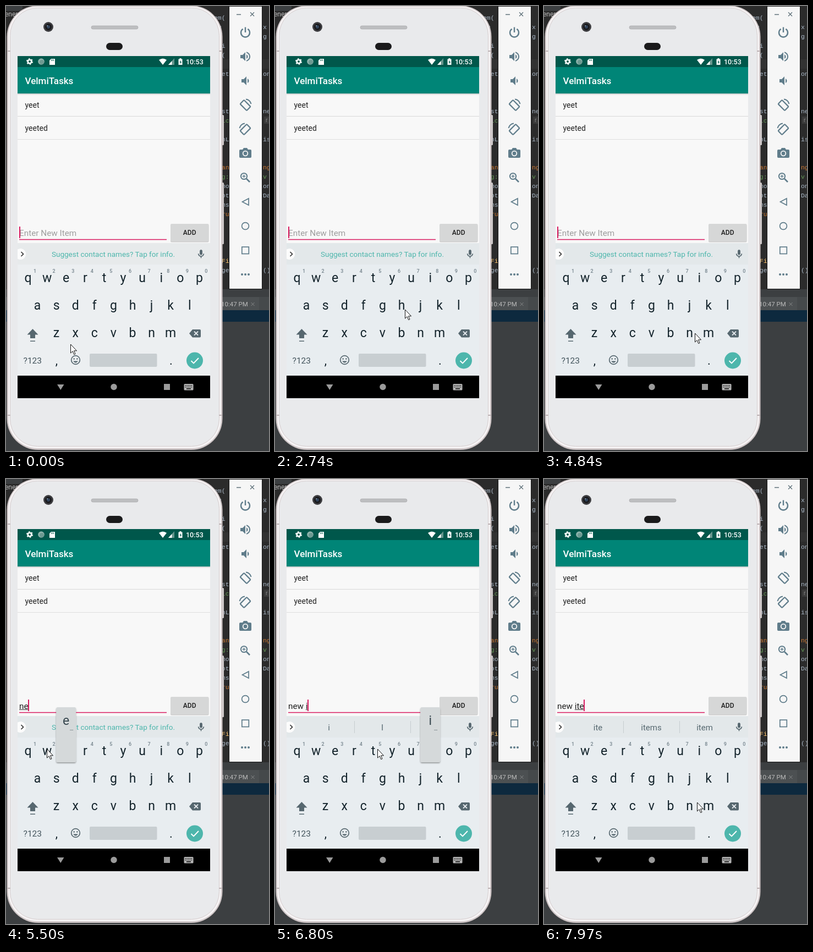
An HTML page for the animation above (8000 ms loop, 478 px wide and 809 px high).

```html
<!DOCTYPE html>
<html lang="en">
<head>
<meta charset="utf-8">
<title>To-do list typing</title>
<style>
html, body { margin: 0; width: 100%; height: 100%; overflow: hidden; background: #3c3f41; }
svg { display: block; width: 478px; height: 809px; }
text { font-family: Roboto, sans-serif; white-space: pre; }
.code { font: 11.5px "Liberation Mono", monospace; fill: #a9b7c6; }
</style>
</head>
<body>
<svg id="stage" viewBox="0 0 478 809"></svg>
<script>
const LOOP = 8000;
const INK = '#13232b', GREY = '#56676f', TOOL = '#607d8b', PINK = '#d81b60', TEAL = '#4db6ac';
const FIELD_SIZE = 15.3;

const rect = (x, y, w, h, fill, extra = '') =>
  `<rect x="${x}" y="${y}" width="${w}" height="${h}" fill="${fill}" ${extra}/>`;
const circle = (x, y, r, fill, extra = '') =>
  `<circle cx="${x}" cy="${y}" r="${r}" fill="${fill}" ${extra}/>`;
const label = (s, x, y, size, fill, extra = '') =>
  `<text x="${x}" y="${y}" font-size="${size}" fill="${fill}" ${extra}>${s}</text>`;
const line = (d, color, width = 1, extra = '') =>
  `<path d="${d}" fill="none" stroke="${color}" stroke-width="${width}" ${extra}/>`;
const shape = (d, fill, extra = '') => `<path d="${d}" fill="${fill}" ${extra}/>`;
// 24-unit icon centred on x, y
const icon = (x, y, scale, body) =>
  `<g transform="translate(${x} ${y}) scale(${scale}) translate(-12 -12)">${body}</g>`;
const MID = 'text-anchor="middle"';

function editor() {
  const rows = [
    [21, 'tem(', ''], [38, 'tem', 'ex'], [55, ' =', '.g'], [72, ' (i', ''], [89, ' t(', ''],
    [123, '  et', 'ion'], [191, '  st', 'ene'], [208, '  ic', '', '#629755'], [242, '  nL', 'Lis'],
    [293, '  an', 'ong', '#cc7832'], [310, '  g:', 'iv', '#629755'], [327, '  mo', 'ion'],
    [344, '  ot', 'yDa'], [361, '  ms', ''], [378, '  ru', '', '#cc7832'], [463, '  Fi', '', '#ffc66d'],
    [480, '  ge', 'r()']
  ];
  let s = rect(0, 0, 478, 515, '#2b2b2b') + rect(0, 0, 30, 9, '#3c3f41') + rect(372, 97, 106, 17, '#323232');
  for (const [y, a, b, color = '#a9b7c6'] of rows) {
    const x = a[0] === 't' ? 371 : 378;
    s += `<text class="code" x="${x}" y="${y + 4}" style="fill:${color}">${a}</text>` +
         `<text class="code" x="460" y="${y + 4}" style="fill:${color}">${b}</text>`;
  }
  s += rect(469, 201, 9, 13, '#3b3b3b') + label('r', 472, 211, 10, '#888');
  s += label('enera', -2, 19, 12, '#bbb');
  s += rect(0, 515, 478, 294, '#3c3f41') + rect(0, 529, 460, 24, '#4c5052') +
       rect(460, 529, 18, 24, '#45494b') + rect(0, 553, 478, 21, '#0d293e');
  s += line('M445.500 539l6 6m0-6l-6 6', '#87898a');
  return s;
}

function phone() {
  return rect(391, 198, 5, 55, '#cfcacb', 'rx="1.5"') + rect(391, 321, 5, 112, '#cfcacb', 'rx="1.5"') +
    rect(1.5, -1, 392, 808, '#cfc6c7', 'rx="57"') +
    rect(4, 1, 387, 803, '#f6f4f5', 'rx="53"') +
    rect(7.5, 3.5, 380, 797, '#e9eaec', 'rx="50" stroke="#d5cccd"') +
    line('M2 82h6M387 82h6M2 744h6M387 744h6', '#bcb2b4', 2) +
    circle(77, 38, 9, '#3d3d40') + circle(77, 38, 6, '#19191c') + circle(77, 38, 3, '#31435a') + circle(75, 36, 1, '#8fa3b5') +
    rect(155, 36, 85, 6, '#bdbec0', 'rx="3" stroke="#a9aaad" stroke-width=".7"') +
    rect(182, 67, 30, 13, '#1a1a1b', 'rx="6.5"') +
    label('10:47 PM', 391, 546, 11.5, '#bbb');
}

function toolbar() {
  const vol = 'M3 9v6h4l5 5V4L7 9H3z';
  const wave = 'M16.5 12c0-1.77-1.02-3.29-2.5-4.03v8.05c1.48-.73 2.5-2.25 2.5-4.02z';
  const far = 'M14 3.23v2.06c2.89.86 5 3.54 5 6.71s-2.11 5.85-5 6.71v2.06c4.01-.91 7-4.49 7-8.77s-2.99-7.86-7-8.77z';
  const turn = rect(7, 4, 10, 17, 'none', `rx="1.2" transform="rotate(-45 12 12.500)" stroke="${TOOL}" stroke-width="2.2"`) +
    line('M13 1.5A10.500 10.500 0 0 1 22.500 10', TOOL, 2);
  return rect(405.5, .5, 60, 514, '#f6f6f6', 'stroke="#151515"') +
    line('M419 15.5h8M444 11.500l7 7m0-7l-7 7', '#5d6f78', 1.3) +
    line('M430.600 41.800A8 8 0 1 0 439.400 41.800M435 38.500v9.500', TOOL, 2.4) +
    icon(435, 92, 1, shape(vol + wave + far, TOOL)) +
    icon(437, 136, 1, shape(vol + wave, TOOL)) +
    icon(435, 180, 1, turn) +
    `<g transform="translate(870 0) scale(-1 1)">${icon(435, 224, 1, turn)}</g>` +
    shape('M426 261h4l2-3h6l2 3h4q2 0 2 2v11q0 2-2 2h-18q-2 0-2-2v-11q0-2 2-2z', TOOL) +
    circle(435, 268, 4.3, TOOL, 'stroke="#f6f6f6" stroke-width="1.8"') +
    circle(432.5, 309.500, 5.6, 'none', `stroke="${TOOL}" stroke-width="2"`) +
    line('M437 314l6 6', TOOL, 2.6) + line('M429.500 309.500h6m-3-3v6', TOOL, 1.3) +
    line('M441 350v12l-11.500-6z', TOOL, 1.7) +
    circle(435, 400, 6.4, 'none', `stroke="${TOOL}" stroke-width="1.7"`) +
    rect(428.8, 438, 12.5, 12.5, 'none', `stroke="${TOOL}" stroke-width="1.7"`) +
    [429, 435, 441].map(x => circle(x, 488, 2, TOOL)).join('');
}

function app() {
  const W = '#fff';
  return rect(21, 91, 350, 622, '#f8f8f8') +
    rect(21, 159, 350, 3, 'url(#fall)') +
    rect(21, 91, 350, 20, '#00574b') + rect(21, 111, 350, 48, '#008577') +
    circle(43, 101, 3.3, 'none', `stroke="${W}" stroke-width="2.600"`) +
    circle(43, 101, 5.2, 'none', `stroke="${W}" stroke-width="1.600" stroke-dasharray="2.720"`) +
    circle(64, 101, 5.8, '#8fb3ac') + circle(65, 102, 4, '#6d9a92') +
    shape('M82 96h7v11h-10v-8z', W) + line('M82.500 97v3m2-3v3m2-3v3', '#00574b', .8) +
    shape('M278 98q7-5 14 0l-7 9z', W) +
    shape('M306 95v12h-11z', '#66958d') + shape('M301.500 100v7h-6.500z', W) +
    shape('M313.500 96.500h2v-1.500h3v1.500h2v10.500h-7z', W) + shape('M317.500 98.500l-2 4h1.500v3l2-4h-1.500z', '#00574b') +
    label('10:53', 327, 106, 12.5, W, 'font-weight="500"') +
    label('VelmiTasks', 34.5, 142, 17, W, 'font-weight="500"') +
    label('yeet', 34.5, 185, 14, '#212121') + label('yeeted', 34.5, 227, 14, '#212121') +
    rect(21, 200, 350, 1, '#d8d8d8') + rect(21, 242, 350, 1, '#dedede') +
    rect(24, 423.800, 268, 1.500, PINK) +
    rect(299, 397.500, 69.500, 32, '#bbb', 'rx="2" opacity=".7"') + rect(299, 396, 69.500, 32, '#d6d7d7', 'rx="2"') +
    label('ADD', 333.700, 416.300, 12, '#1c1c1c', MID + ' font-weight="500"');
}

const KEYS = {};
function keyboard() {
  let s = rect(21, 431, 350, 39, '', 'id="strip"') + rect(21, 470, 350, 202, '', 'id="board"');
  const rows = [['qwertyuiop', 40, 502], ['asdfghjkl', 57, 552], ['zxcvbnm', 91.500, 602]];
  rows.forEach(([chars, x0, y], r) => [...chars].forEach((c, i) => {
    const x = x0 + 34.6 * i;
    KEYS[c] = [x, 415 + r * 50];
    s += label(c, x, y, 23, INK, MID);
    if (!r) s += label((i + 1) % 10, x + 12.500, 485, 9, '#72818a', MID + ' font-weight="500"');
  }));
  s += shape('M21 442.500A10 10 0 1 1 21 459.500z', '#fcfcfc') + line('M27.500 447l4 4-4 4', '#333', 1.7);
  s += icon(354.500, 451, .8, shape('M12 14c1.660 0 3-1.340 3-3V5c0-1.660-1.340-3-3-3S9 3.340 9 5v6c0 1.660 1.340 3 3 3zm5-3c0 2.760-2.240 5-5 5s-5-2.240-5-5H5c0 3.530 2.610 6.430 6 6.920V21h2v-3.080c3.390-.49 6-3.390 6-6.920z', GREY));
  s += shape('M48.500 587l10 10.500h-5.500v6.500h-9v-6.500h-5.500z', GREY) + rect(44, 608.500, 9, 1.500, GREY);
  s += shape('M339 588h13q2 0 2 2v10.500q0 2-2 2h-13l-6-7.200z', GREY) + line('M342 591.700l7 7m0-7l-7 7', '#e8edf0', 1.900);
  s += label('?123', 48.300, 649.500, 15.500, '#43545c', MID) + label(',', 92, 652, 22, INK, MID) + label('.', 300, 652, 22, INK, MID);
  s += circle(126.500, 643.500, 7.800, 'none', `stroke="${GREY}" stroke-width="1.700"`) +
    circle(123.700, 641.500, 1.300, GREY) + circle(129.300, 641.500, 1.300, GREY) + shape('M122 645.500h9q-4.500 6-9 0z', GREY);
  s += rect(152, 632, 122.500, 24, '#c8ced1', 'rx="2"');
  s += circle(343, 644.500, 15, TEAL) + line('M336.500 645l4.500 4.500 9-9.500', '#fff', 1.900);
  s += rect(21, 672, 350, 41, '#000') + shape('M93 688h12.500l-6.250 10z', '#9b9b9b') +
    circle(196, 692.500, 5.700, '#9b9b9b') + rect(287, 687, 11, 11, '#9b9b9b') +
    rect(323.500, 687, 17, 11.500, '#b5b5b5', 'rx="1.500"') +
    line('M325.500 690h13M325.500 692.800h13', '#000', 1.300, 'stroke-dasharray="1.400 1.400"') + rect(328, 695, 8, 1.500, '#000');
  return s;
}

const stage = document.getElementById('stage');
stage.innerHTML = `<defs>
  <linearGradient id="fall" x2="0" y2="1"><stop stop-color="#c4c4c4"/><stop offset="1" stop-color="#f8f8f8"/></linearGradient>
  <filter id="lift" x="-30%" y="-10%" width="160%" height="125%"><feDropShadow dx="0" dy="1.500" stdDeviation="1.300" flood-opacity=".4"/></filter>
  </defs>` + editor() + phone() + app() + keyboard() +
  '<g id="hints"></g><g id="field"></g><g id="popup"></g>' + toolbar() +
  `<g id="mouse">${shape('M.5 1V17l3.600-3.400 2.600 6 2.300-1-2.500-5.800H11.500z', '#fff', 'stroke="#111" stroke-width="1"')}</g>`;
const el = id => document.getElementById(id);

// time, x, y
const MOUSE = [
  [0, 117, 614], [150, 130, 603], [270, 150, 594], [820, 153, 592], [940, 160, 588], [1060, 168, 584],
  [1180, 178, 579], [1300, 185, 574], [1450, 236, 561], [1600, 242, 556], [1750, 236, 551], [3010, 235, 549],
  [3130, 234, 547], [3250, 233, 546], [4260, 213, 546], [4410, 141, 546], [4560, 215, 560], [4690, 275, 586],
  [4840, 274, 594], [4960, 270, 592], [5080, 195, 550], [5200, 106, 497], [5350, 94, 496], [5500, 74, 490],
  [5650, 80, 494], [5770, 150, 570], [5890, 233, 641], [6170, 240, 644], [6290, 240, 640], [6410, 262, 560],
  [6530, 281, 494], [6650, 278, 493], [6800, 186, 490], [6920, 170, 497], [7070, 150, 496], [7190, 128, 494],
  [7340, 104, 492], [7580, 110, 496], [7730, 125, 499], [7850, 200, 545], [7970, 278, 587]
];
// time, committed text, text being composed, suggestions
const TIP = 'Suggest contact names? Tap for info.';
const TYPED = [
  [0, '', '', TIP], [4960, '', 'n', TIP], [5500, '', 'ne', TIP], [5650, '', 'new', TIP], [6170, 'new ', '', ''],
  [6800, 'new ', 'i', ['i', 'I', 'in']], [7340, 'new ', 'it', ['it', 'It', 'its']],
  [7730, 'new ', 'ite', ['ite', 'items', 'item']]
];
const POPUPS = [[0, ''], [4960, 'n'], [5200, ''], [5500, 'e'], [5650, 'w'], [5890, ''], [6800, 'i'], [6920, ''],
  [7340, 't'], [7580, ''], [7730, 'e'], [7970, '']];
const BLINKS = [0, 150, 670, 1180, 1750, 2150, 2740, 3250, 3680, 4110, 4690];

const pen = document.createElement('canvas').getContext('2d');
function width(s) {
  pen.font = `${FIELD_SIZE}px Roboto, sans-serif`;
  return pen.measureText(s).width;
}
const at = (table, t) => table.findLast(row => row[0] <= t);

const cache = {};
function put(id, html) {
  if (cache[id] !== html) el(id).innerHTML = cache[id] = html;
}

function hints(words) {
  if (!words) return '';
  if (words === TIP) return label(TIP, 195, 456, 13.5, TEAL, MID);
  return words.map((w, i) => label(w, 98 + 97 * i, 456.500, 15, '#566870', MID)).join('') +
    rect(144, 440, 1, 22, '#c6cccf') + rect(246, 440, 1, 22, '#c6cccf');
}

function field(done, draft, caret) {
  const text = done + draft, x0 = 24 + width(done), x1 = 24 + width(text);
  return (text ? label(text, 24, 417.500, FIELD_SIZE, '#212121')
               : label('Enter New Item', 24, 417.500, FIELD_SIZE, '#9d9d9d')) +
    (draft ? rect(x0, 418.700, x1 - x0, 1, '#212121') : '') +
    (caret ? rect(Math.floor(x1), 401, 2, 21, PINK) : '');
}

function popup(key) {
  if (!key) return '';
  const [x, y] = KEYS[key];
  return rect(x - 18, y, 36, 100, '#d5d9da', 'rx="3" filter="url(#lift)"') +
    label(key, x, y + 32, 23, '#37474f', MID) + label('…', x + 10, y + 42, 10, '#37474f', MID);
}

function render(t) {
  const [, x, y] = at(MOUSE, t);
  const [, done, draft, words] = at(TYPED, t);
  const caret = BLINKS.filter(b => b <= t).length % 2 === 1;
  el('mouse').setAttribute('transform', `translate(${x} ${y})`);
  el('strip').setAttribute('fill', t < 150 ? '#e7eaeb' : '#e3e8ea');
  el('board').setAttribute('fill', t < 150 ? '#eceff1' : '#e8edf0');
  put('hints', hints(words));
  put('field', field(done, draft, caret));
  put('popup', popup(at(POPUPS, t)[1]));
}

const start = performance.now();
function tick() {
  render((performance.now() - start) % LOOP);
  requestAnimationFrame(tick);
}
tick();
</script>
</body>
</html>
```
